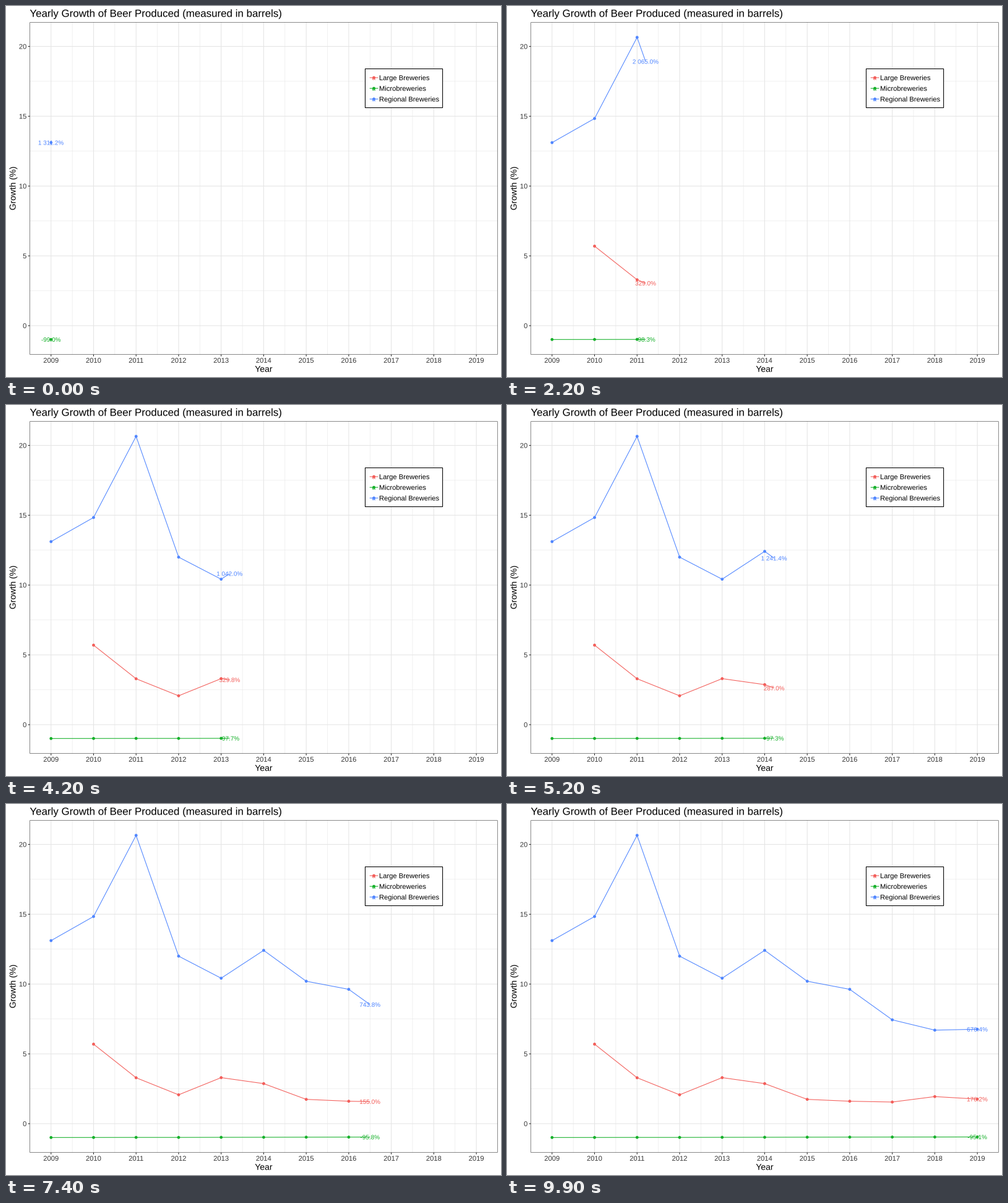
A matplotlib script for the animation above (10000 ms loop, 800 by 600 pixels).

```python
import numpy as np
import matplotlib.pyplot as plt
from matplotlib.animation import FuncAnimation
from matplotlib.patches import Circle, PathPatch, Rectangle
from matplotlib.textpath import TextPath
from matplotlib.transforms import Affine2D

plt.rcParams["font.family"] = "Liberation Sans"

W, H, DPI = 800, 600, 100
FRAMES, INTERVAL = 100, 100
PT = 72 / DPI  # points per pixel

LEFT, RIGHT, TOP, BOTTOM = 38.4, 794.5, 26.3, 563.8
GRID, DARK, TICK_TEXT = "#E5E5E5", "#202020", "#363636"
THIN, HAIR = 1.07, 0.53
TITLE, AXIS, SMALL, LABEL = 16.92, 14, 11.2, 9.96

YEARS = np.arange(2009, 2020)
NAN = np.nan
SERIES = [
    ("Large Breweries", "#F35E5A",
     [NAN, 569.6, 329.0, 206.9, 329.8, 287.0, 174.2, 160.8, 155.0, 194.0, 176.2]),
    ("Microbreweries", "#17B12B",
     [-99.0, -98.7, -98.3, -98.3, -97.7, -97.3, -96.7, -96.2, -95.8, -95.5, -95.1]),
    ("Regional Breweries", "#5086FF",
     [1311.2, 1483.9, 2065.0, 1200.0, 1042.0, 1241.4, 1020.3, 962.3, 743.8, 669.9, 676.4]),
]

# Each year is reached on a whole frame
KEYS = np.round(np.linspace(0, FRAMES - 1, len(YEARS)))


def px(year):
    return LEFT + (RIGHT - LEFT) * (np.asarray(year) - 2008.5) / 11


def py(growth):
    return 517 - 22.58 * np.asarray(growth)


fig = plt.figure(figsize=(W / DPI, H / DPI), dpi=DPI, facecolor="white")
ax = fig.add_axes([0, 0, 1, 1])
ax.set_xlim(0, W)
ax.set_ylim(H, 0)
ax.axis("off")


def line(x, y, color, width=THIN, z=1):
    return ax.plot(x, y, color=color, lw=width * PT, zorder=z, snap=False,
                   solid_capstyle="butt", solid_joinstyle="round")[0]


def dot(x, y, color, z=5):
    return ax.add_patch(Circle((x, y), 2.4, fc=color, lw=0, zorder=z, snap=False))


def box(x0, y0, x1, y1, edge, width, fill="none", z=6):
    ax.add_patch(Rectangle((x0, y0), x1 - x0, y1 - y0, fc=fill, ec=edge,
                           lw=width * PT, zorder=z, snap=False))


def glyphs(x, y, s, size, ha="left", angle=0):
    """Outline of s with its baseline at (x, y), free of pixel rounding."""
    path = TextPath((0, 0), s, size=size)
    ext = path.get_extents()
    shift = {"left": 0, "center": (ext.x0 + ext.x1) / 2, "right": ext.x1}[ha]
    move = Affine2D().translate(-shift, 0).rotate_deg(angle).scale(1, -1)
    return path.transformed(move.translate(x, y))


def text(x, y, s, size, color="black", ha="left", angle=0, z=4):
    return ax.add_patch(PathPatch(glyphs(x, y, s, size, ha, angle), fc=color,
                                  lw=0, zorder=z, snap=False))


def draw_grid():
    for x in px(YEARS[:-1] + 0.5):
        line([x, x], [TOP, BOTTOM], GRID, HAIR, 0.5)
    for y in py(np.arange(2.5, 20, 5)):
        line([LEFT, RIGHT], [y, y], GRID, HAIR, 0.5)
    for year in YEARS:
        x = px(year)
        line([x, x], [TOP, BOTTOM], GRID)
        line([x, x], [BOTTOM, BOTTOM + 2.75], DARK)
        text(x, 576.9, str(year), SMALL, TICK_TEXT, "center")
    for value in range(0, 21, 5):
        y = py(value)
        line([LEFT, RIGHT], [y, y], GRID)
        line([LEFT - 2.75, LEFT], [y, y], DARK)
        text(32.9, y + 4, str(value), SMALL, TICK_TEXT, "right")
    # Only the inner half of the border stroke shows
    inset = HAIR / 2
    box(LEFT + inset, TOP + inset, RIGHT - inset, BOTTOM - inset, DARK, HAIR)


def draw_titles():
    text(LEFT, 17.6, "Yearly Growth of Beer Produced (measured in barrels)", TITLE)
    text((LEFT + RIGHT) / 2, 591.7, "Year", AXIS, ha="center")
    text(15.5, (TOP + BOTTOM) / 2, "Growth (%)", AXIS, ha="center", angle=90)


def draw_legend():
    box(580.5, 101.6, 705.6, 164.5, "black", THIN, "white", 7)
    for i, (name, color, _) in enumerate(SERIES):
        y = 115.9 + 17.28 * i
        line([587.7, 601.5], [y, y], color, z=8)
        text(594.6, y + 3.6, "a", LABEL, color, "center", z=9)
        dot(594.6, y, color, 10)
        text(603, y + 4, name, SMALL, z=9)


def percent(v):
    return f"{v:,.1f}%".replace(",", " ")


class Track:
    """One series: revealed line, dots at passed years, label at the head."""

    def __init__(self, color, values):
        self.values = np.array(values)
        self.growth = self.values / 100
        self.line = line([], [], color, z=3)
        self.label = text(0, 0, "0", LABEL, color)
        self.dots = [(k, dot(px(YEARS[k]), py(g), color))
                     for k, g in enumerate(self.growth) if not np.isnan(g)]

    def update(self, pos):
        k = int(pos)
        nxt = min(k + 1, len(YEARS) - 1)
        frac = pos - k
        g = self.growth
        shown = not np.isnan(g[k])
        self.line.set_visible(shown)
        self.label.set_visible(shown)
        for j, mark in self.dots:
            mark.set_visible(j <= k)
        if not shown:
            return
        x = px(YEARS[0] + pos)
        y = py(g[k] + (g[nxt] - g[k]) * frac)
        self.line.set_data(np.append(px(YEARS[:k + 1]), x),
                           np.append(py(g[:k + 1]), y))
        value = self.values[nxt if frac > 0.499 else k]
        self.label.set_path(glyphs(x, y + 3.6, percent(value), LABEL, "center"))


draw_grid()
draw_titles()
draw_legend()
tracks = [Track(color, values) for _, color, values in SERIES]


def update(i):
    pos = np.interp(i, KEYS, np.arange(len(YEARS)))
    for track in tracks:
        track.update(pos)
    return []


anim = FuncAnimation(fig, update, frames=FRAMES, interval=INTERVAL,
                     init_func=lambda: update(0), repeat=True, repeat_delay=0)
plt.show()
```
